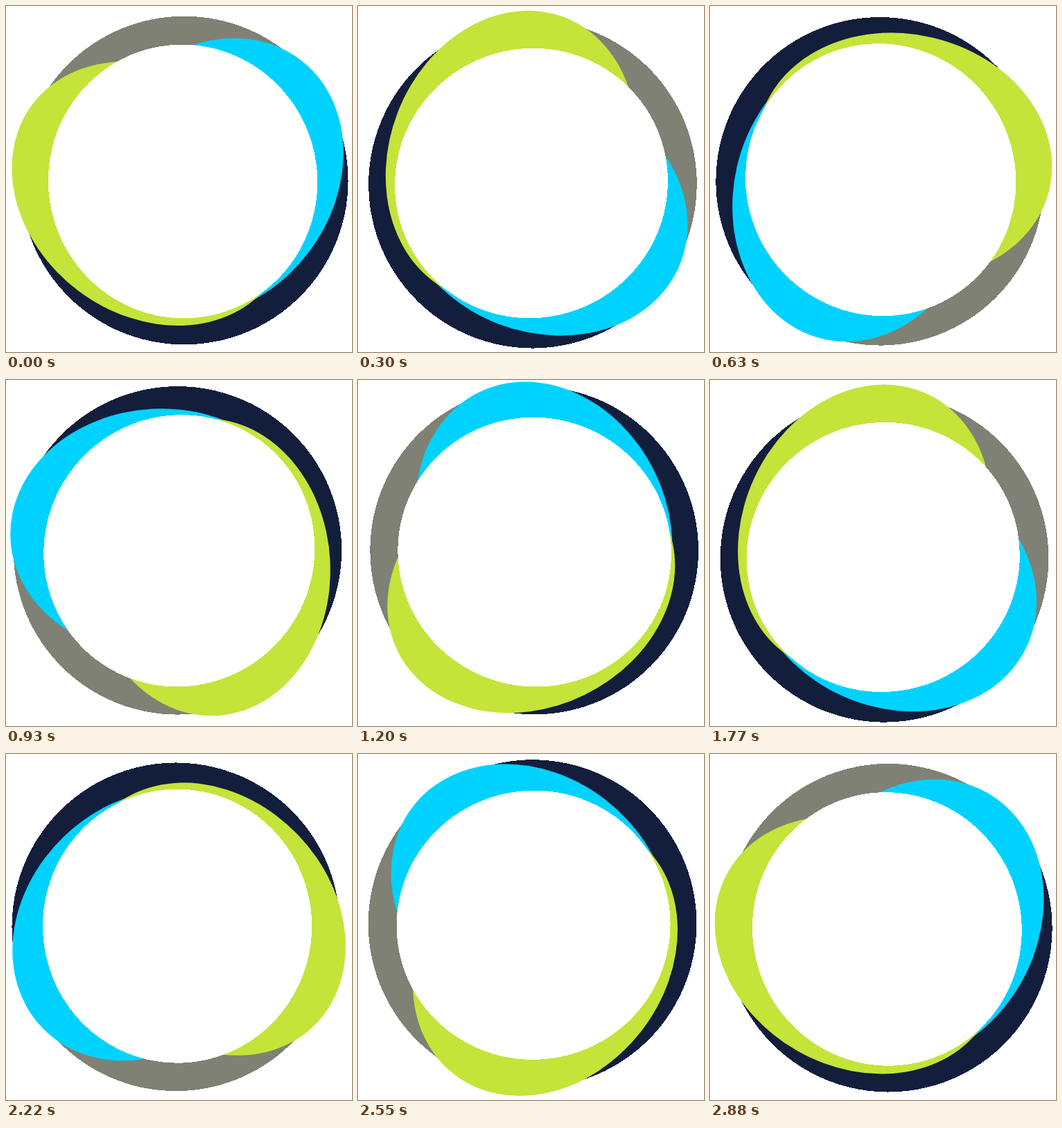
Recreate the animation shown at these times as an HTML page. Size 498 by 498 pixels, loop 2.91 s.

```html
<!DOCTYPE html>
<html lang="en">
<head>
<meta charset="utf-8">
<title>Spinning ring</title>
<style>
  html, body { margin: 0; width: 100%; height: 100%; overflow: hidden; background: #fff; }
  svg { display: block; width: 100%; height: 100%; }
  .crisp { shape-rendering: crispEdges; }
</style>
</head>
<body>
<svg viewBox="0 0 498 498">
  <g id="ring">
    <g class="crisp" transform="translate(6 0.3)">
      <circle r="236" fill="#7f8174"/>
      <path d="M198 -128A236 236 0 1 1 -234 -29Z" fill="#131e3c"/>
    </g>
    <ellipse rx="213.5" ry="177" transform="translate(44.3 -3) rotate(307)" fill="#00d2ff"/>
    <ellipse rx="214" ry="174.8" transform="translate(-41.3 19.7) rotate(217)" fill="#c4e43a"/>
    <ellipse class="crisp" rx="193.6" ry="197.1" transform="translate(4.2 2.1) rotate(-10)" fill="#fff"/>
  </g>
</svg>
<script>
const STEP_MS = 30, STEPS = 97, TURNS = 2, CENTER = 250.4;
const ring = document.getElementById("ring");

function draw() {
  const step = Math.floor(performance.now() / STEP_MS) % STEPS;
  const angle = step * 360 * TURNS / STEPS;
  ring.setAttribute("transform", `translate(${CENTER} ${CENTER}) rotate(${angle})`);
  requestAnimationFrame(draw);
}
draw();
</script>
</body>
</html>
```
